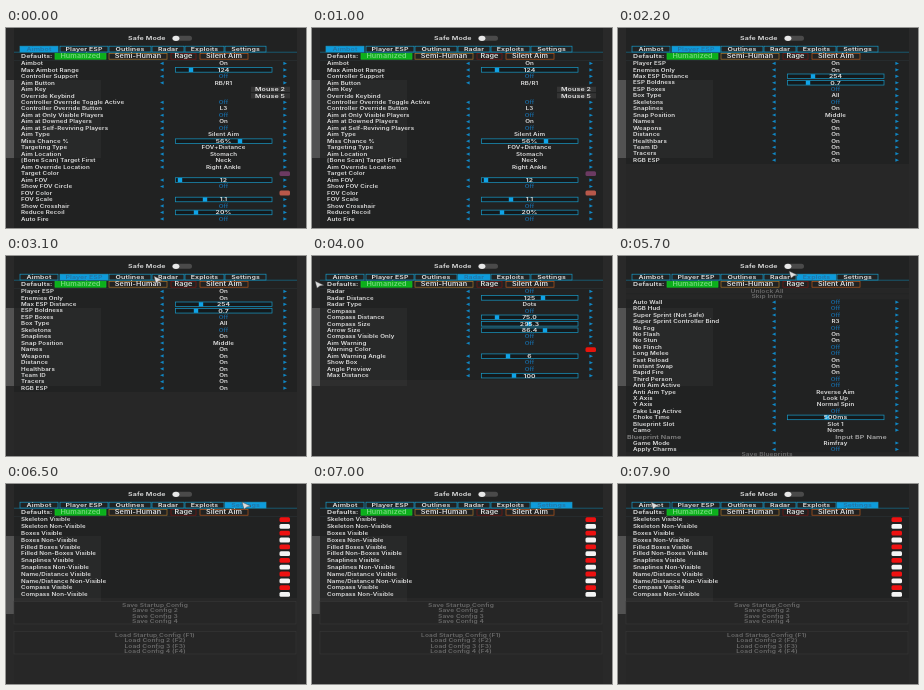
These frames come from a looping animation (300x200 px, 8000 ms). An HTML page with a canvas:

```html
<!DOCTYPE html>
<html lang="en">
<head>
<meta charset="utf-8">
<title>Menu tour</title>
<style>
html, body { margin: 0; width: 100%; height: 100%; overflow: hidden; background: #292929; }
canvas { display: block; width: 300px; height: 200px; }
</style>
</head>
<body>
<canvas id="stage"></canvas>
<script>
const LOOP = 8000;
const SQUASH = 0.77;
const canvas = document.getElementById('stage');
const ctx = canvas.getContext('2d');
const ratio = window.devicePixelRatio || 1;
canvas.width = 300 * ratio;
canvas.height = 200 * ratio;

const CYAN = '#1899c6', BLUE = '#1187c4', WHITE = '#e2e2e2', DIM = '#17659a', PANEL = '#212222';

// A row is "label|value"; values: text, ~text@handle (slider), #colour, [key], >input
const pages = {
  Aimbot: { y: 35.4, step: 6.48, end: 200, rows: [
    'Aimbot|On', 'Max Aimbot Range|~124@185', 'Controller Support|Off', 'Aim Button|RB/R1',
    'Aim Key|[Mouse 2', 'Override Keybind|[Mouse 5', 'Controller Override Toggle Active|Off',
    'Controller Override Button|L3', 'Aim at Only Visible Players|Off', 'Aim at Downed Players|On',
    'Aim at Self-Reviving Players|Off', 'Aim Type|Silent Aim', 'Miss Chance %|~56%@234',
    'Targeting Type|FOV+Distance', 'Aim Location|Stomach', '[Bone Scan] Target First|Neck',
    'Aim Override Location|Right Ankle', 'Target Color|#6b3a62', 'Aim FOV|~12@174',
    'Show FOV Circle|Off', 'FOV Color|#b8584a', 'FOV Scale|~1.1@199', 'Show Crosshair|Off',
    'Reduce Recoil|~20%@190', 'Auto Fire|Off'] },
  'Player ESP': { y: 35.4, step: 6.45, end: 136, rows: [
    'Player ESP|On', 'Enemies Only|On', 'Max ESP Distance|~254@195', 'ESP Boldness|~0.7@190',
    'ESP Boxes|Off', 'Box Type|All', 'Skeletons|Off', 'Snaplines|On', 'Snap Position|Middle',
    'Names|On', 'Weapons|On', 'Distance|On', 'Healthbars|On', 'Team ID|On', 'Tracers|On', 'RGB ESP|On'] },
  Radar: { y: 35.4, step: 6.48, end: 124, rows: [
    'Radar|Off', 'Radar Distance|~125@231', 'Radar Type|Dots', 'Compass|Off',
    'Compass Distance|~75.0@185', 'Compass Size|~295.3@217', 'Arrow Size|~86.4@233',
    'Compass Visible Only|Off', 'Aim Warning|Off', 'Warning Color|#e8140c',
    'Aim Warning Angle|~6@196', 'Show Box|Off', 'Angle Preview|Off', 'Max Distance|~100@202'] },
  Exploits: { y: 46.2, step: 6.4, end: 200, rows: [
    'Auto Wall|Off', 'RGB Hud|Off', 'Super Sprint (Not Safe)|Off', 'Super Sprint Controller Bind|R3',
    'No Fog|Off', 'No Flash|On', 'No Stun|On', 'No Flinch|Off', 'Long Melee|Off', 'Fast Reload|On',
    'Instant Swap|On', 'Rapid Fire|On', 'Third Person|Off', 'Anti Aim Active|Off',
    'Anti Aim Type|Reverse Aim', 'X Axis|Look Up', 'Y Axis|Normal Spin', 'Fake Lag Active|Off',
    'Choke Time|~500ms@209', 'Blueprint Slot|Slot 1', 'Camo|None', 'Blueprint Name|>Input BP Name',
    'Game Mode|Rimfray', 'Apply Charms|Off'],
    buttons: [['Unlock All', 35], ['Skip Intro', 40.6], ['Save Blueprints', 198.6]] },
  Settings: { y: 35.6, step: 6.8, end: 114,
    rows: ['Skeleton', 'Boxes', 'Filled Boxes', 'Snaplines', 'Name/Distance', 'Compass'].flatMap(s => [
      s + ' Visible|#ee1111',
      (s === 'Filled Boxes' ? 'Filled Non-Boxes Visible' : s + ' Non-Visible') + '|#f4f4f4']),
    groups: [117.5, 147.5],
    buttons: ['Save Startup Config', 'Save Config 2', 'Save Config 3', 'Save Config 4',
      'Load Startup Config (F1)', 'Load Config 2 (F2)', 'Load Config 3 (F3)', 'Load Config 4 (F4)']
      .map((s, i) => [s, (i < 4 ? 121 : 129) + i * 5.5]) }
};

const schedule = [[0, 'Aimbot'], [1500, 'Player ESP'], [3200, 'Radar'], [5000, 'Exploits'], [6500, 'Settings']];

const tabs = [['Aimbot', 14, 52], ['Player ESP', 54, 102], ['Outlines', 103, 145],
  ['Radar', 146, 178], ['Exploits', 179, 218], ['Settings', 219, 260]];

const presets = [['Humanized', 49, 100, '#12c022'], ['Semi-Human', 103, 161, '#a8752c'],
  ['Rage', 165, 190, '#7c1712'], ['Silent Aim', 194, 242, '#b5561c']];

// Pointer strokes: each a run of [time, x, y]
const strokes = [
  [[1150, -10, 30], [1480, 76, 19], [1600, 76, 19], [1880, -10, 30]],
  [[2850, -10, 34], [3150, 160, 19], [3450, 160, 19], [4000, 3, 25], [4600, 3, 25],
   [4950, 198, 19], [5400, 198, 19], [5700, 171, 15], [6050, 196, 17], [6450, 236, 18],
   [6600, 236, 18], [6850, 240, -12]],
  [[7300, 228, 19], [7850, 33, 18], [8000, 33, 18]]
];

function fill(x, y, w, h, color) {
  ctx.fillStyle = color;
  ctx.fillRect(x, y, w, h);
}

function outline(x, y, w, h, color, weight = 0.7) {
  ctx.strokeStyle = color;
  ctx.lineWidth = weight;
  ctx.strokeRect(x, y, w, h);
}

function text(s, x, y, color = WHITE, align = 'left', size = 6.2) {
  ctx.save();
  ctx.translate(x, y);
  ctx.scale(1, SQUASH);
  ctx.font = `600 ${size}px Inter, "Open Sans", sans-serif`;
  ctx.textAlign = align;
  ctx.fillStyle = color;
  ctx.fillText(s, 0, size * 0.36);
  ctx.restore();
}

function arrow(x, y, dir) {
  ctx.fillStyle = BLUE;
  ctx.beginPath();
  ctx.moveTo(x + dir * 2, y);
  ctx.lineTo(x - dir * 1.6, y - 1.6);
  ctx.lineTo(x - dir * 1.6, y + 1.6);
  ctx.fill();
}

function swatch(y, color) {
  ctx.fillStyle = color;
  ctx.beginPath();
  ctx.roundRect(273.5, y - 2.4, 10.5, 4.8, 1.5);
  ctx.fill();
}

function slider(spec, y) {
  const [label, x] = spec.split('@');
  fill(169.5, y - 2.3, 96.5, 4.6, '#14191b');
  outline(169.5, y - 2.3, 96.5, 4.6, CYAN);
  fill(x - 2.2, y - 2.1, 4.4, 4.2, '#10a4e8');
  text(label, 217.5, y, WHITE, 'center', 6.8);
}

function drawRow(row, y) {
  const [label, value] = row.split('|');
  const kind = value[0], rest = value.slice(1);
  if (kind === '>') {
    text(label, 9, y, '#858585', 'left', 7.1);
    return text(rest, 243, y, '#a8a8a8', 'center', 7.1);
  }
  text(label, 15, y);
  if (kind === '#') return swatch(y, value);
  if (kind === '[') {
    fill(245, y - 2.6, 39, 5.2, '#343434');
    return text(rest, 264, y, WHITE, 'center', 7.1);
  }
  arrow(156, y, -1);
  arrow(279, y, 1);
  if (kind === '~') slider(rest, y);
  else text(value, 217.5, y, value === 'Off' ? DIM : WHITE, 'center');
}

function drawBackdrop(end) {
  fill(0, 0, 300, 200, '#292929');
  fill(0, 52, 8, 78, '#525252');
  fill(8, 0, 283, 200, '#272727');
  fill(8, 0, 283, end, PANEL);
  fill(8, 52, 87, 78, 'rgba(255, 255, 255, 0.03)');
}

function drawHeader(active) {
  text('Safe Mode', 122, 10.3, WHITE, 'left', 7.1);
  ctx.fillStyle = '#4a4a4a';
  ctx.beginPath();
  ctx.roundRect(166, 7.8, 20, 5, 2.5);
  ctx.fill();
  ctx.fillStyle = '#e8e8e8';
  ctx.beginPath();
  ctx.ellipse(170, 10.3, 3.4, 3.4 * SQUASH, 0, 0, 7);
  ctx.fill();

  fill(8, 23.8, 283, 0.7, '#146f8e');
  for (const [name, l, r] of tabs) {
    const on = name === active;
    fill(l, 18.2, r - l, 5.8, on ? '#0e9bdc' : PANEL);
    outline(l, 18.2, r - l, 5.8, CYAN);
    text(name, (l + r) / 2, 21.2, on ? '#2574a3' : WHITE, 'center', 7);
  }
  text('Defaults:', 15, 28.1, WHITE, 'left', 7);
  presets.forEach(([name, l, r, color], i) => {
    if (!i) fill(l, 25.4, r - l, 5.8, '#0caf1c');
    outline(l, 25.4, r - l, 5.8, color);
    text(name, (l + r) / 2, 28.3, i ? WHITE : '#74d87c', 'center', 7.2);
  });
  fill(8, 32, 283, 0.5, '#2a3539');
}

function drawPage(page) {
  for (const y of page.groups || []) {
    fill(8, y, 282, 22.5, '#262626');
    outline(8, y, 282, 22.5, '#383838', 0.6);
  }
  for (const [label, y] of page.buttons || []) {
    if (!page.groups) fill(8, y - 2.5, 283, 5, '#262626');
    text(label, 149, y, '#6a6a6a', 'center', 6.6);
  }
  page.rows.forEach((row, i) => drawRow(row, page.y + i * page.step));
}

function drawPointer(t) {
  const path = strokes.find(s => t >= s[0][0] && t <= s[s.length - 1][0]);
  if (!path) return;
  const i = Math.max(1, path.findIndex((p, n) => n && t <= p[0]));
  const a = path[i - 1], b = path[i];
  const u = (t - a[0]) / (b[0] - a[0]);
  const k = u * u * (3 - 2 * u);
  ctx.save();
  ctx.translate(a[1] + (b[1] - a[1]) * k, a[2] + (b[2] - a[2]) * k);
  ctx.scale(1, SQUASH);
  ctx.beginPath();
  ctx.moveTo(0, 0);
  ctx.lineTo(9, 5.6);
  ctx.lineTo(4.8, 6.4);
  ctx.lineTo(2, 9.5);
  ctx.closePath();
  ctx.fillStyle = '#dedede';
  ctx.fill();
  ctx.strokeStyle = '#333';
  ctx.lineWidth = 0.5;
  ctx.stroke();
  ctx.restore();
}

function render(now) {
  const t = now % LOOP;
  const active = schedule.filter(s => s[0] <= t).pop()[1];
  ctx.setTransform(ratio, 0, 0, ratio, 0, 0);
  ctx.letterSpacing = '0.1px';
  drawBackdrop(pages[active].end);
  drawHeader(active);
  drawPage(pages[active]);
  drawPointer(t);
}

const start = performance.now();
function tick() {
  render(performance.now() - start);
  requestAnimationFrame(tick);
}
tick();
</script>
</body>
</html>
```
